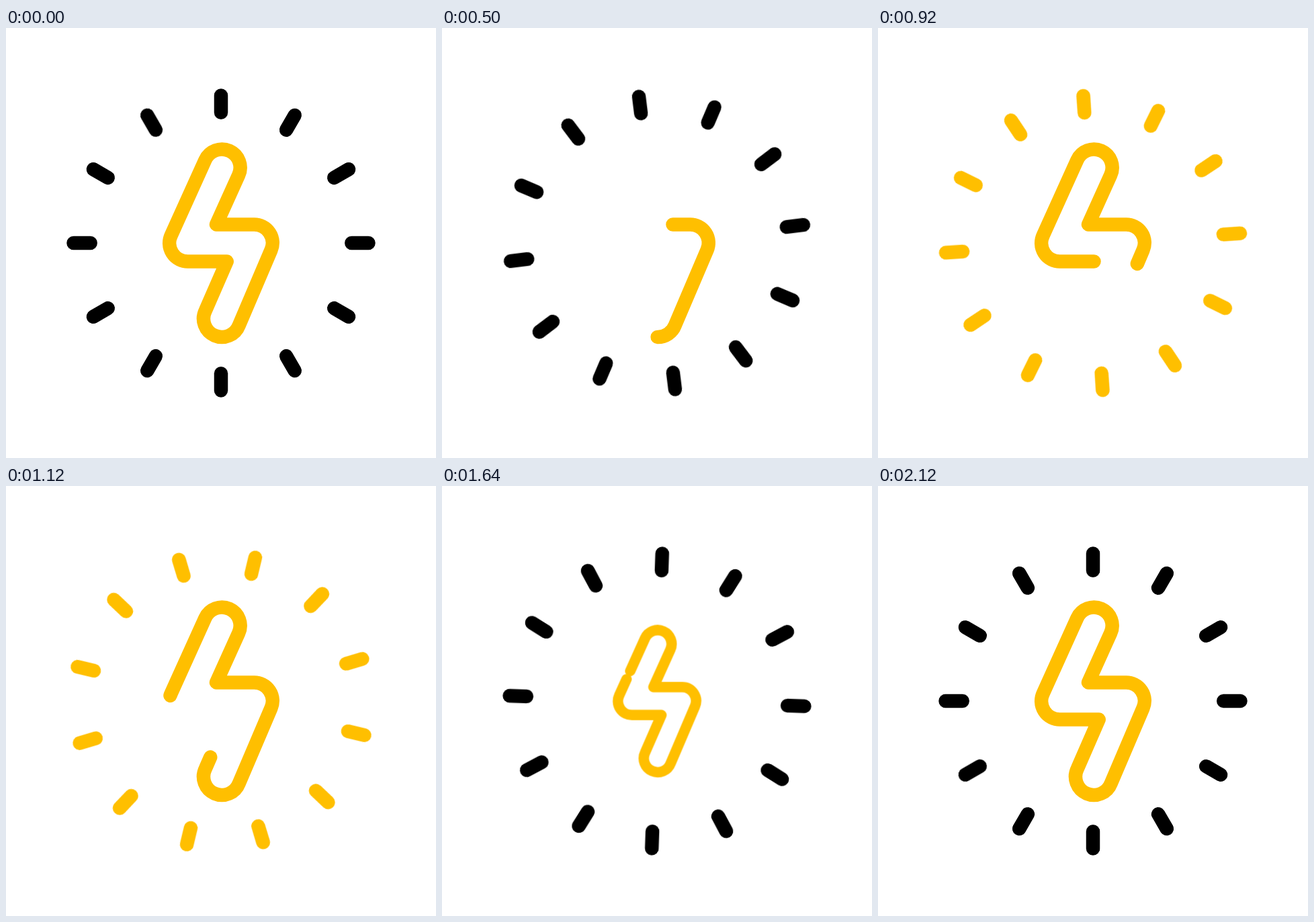
Animation of 640x640 px, one loop 3.02 s. Source, as an HTML page:

```html
<!DOCTYPE html>
<html lang="en">
<head>
<meta charset="utf-8">
<title>Energy bolt</title>
<style>
  html, body { margin: 0; width: 100%; height: 100%; overflow: hidden; background: #fff; }
  svg { display: block; width: 100vw; height: 100vh; }
  path { fill: none; stroke-width: 20.5; stroke-linecap: round; stroke-linejoin: round; }
  #ticks, #bolt { transform-origin: 320px 320px; }
  #ticks {
    stroke: #000;
    animation: turn 3020ms infinite, tint 3020ms step-end infinite;
  }
  #bolt { stroke: #ffbf00; animation: pulse 3020ms linear infinite; }

  @keyframes turn {
    0% { transform: rotate(0deg); animation-timing-function: cubic-bezier(.65, 0, .02, 1); }
    70.2%, 100% { transform: rotate(-90deg); }
  }
  @keyframes tint {
    0% { stroke: #000; }
    21.19% { stroke: #ffbf00; }
    50.99%, 100% { stroke: #000; }
  }
  @keyframes pulse {
    0%, 47.68% { transform: scale(1); animation-timing-function: ease-in-out; }
    54.97% { transform: scale(.753); animation-timing-function: ease-in-out; }
    66.23%, 100% { transform: scale(1); }
  }
</style>
</head>
<body>
<svg viewBox="0 0 640 640">
  <g id="ticks"></g>
  <g id="bolt"></g>
</svg>
<script>
  const LOOP = 3020, STEP = 20, MOVE_END = 2120;
  const OUTLINE = 'M245.7 308.8L296.4 196.6A27.3 27.3 0 1 1 346.2 219.1L313 292.5H369.4' +
    'A27.3 27.3 0 0 1 394.5 330.7L346.8 442.5A27.3 27.3 0 1 1 296.7 420.9' +
    'L328.7 347.5H270.6A27.3 27.3 0 0 1 245.7 308.8Z';

  function addPath(parent, d) {
    const path = document.createElementNS('http://www.w3.org/2000/svg', 'path');
    path.setAttribute('d', d);
    return document.getElementById(parent).appendChild(path);
  }

  for (let i = 0; i < 12; i++) {
    addPath('ticks', 'M320 100.5V125.7').setAttribute('transform', `rotate(${i * 30} 320 320)`);
  }
  const strokes = [addPath('bolt', OUTLINE), addPath('bolt', OUTLINE)];
  const length = strokes[0].getTotalLength();

  // Smooth monotone curve through [time, value] keys, flat at both ends.
  function curve(keys) {
    const rate = i => (keys[i + 1][1] - keys[i][1]) / (keys[i + 1][0] - keys[i][0]);
    const slopes = keys.map((_, i) => {
      if (i === 0 || i === keys.length - 1) return 0;
      const a = rate(i - 1), b = rate(i);
      return a * b > 0 ? 2 * a * b / (a + b) : 0;
    });
    return t => {
      let i = 0;
      while (i < keys.length - 2 && t > keys[i + 1][0]) i++;
      const [t0, v0] = keys[i], [t1, v1] = keys[i + 1];
      const h = t1 - t0, u = (t - t0) / h, w = 1 - u;
      return v0 * (1 + 2 * u) * w * w + slopes[i] * h * u * w * w +
             v1 * (3 - 2 * u) * u * u - slopes[i + 1] * h * u * u * w;
    };
  }

  // Both ends of the drawn part, as distance along the outline.
  const tail = curve([[0, 58], [500, 319.6], [760, 462.5], [940, 714], [1120, 798],
                      [1440, 843], [1640, 855], [MOVE_END, 858]]);
  const head = curve([[0, 858], [500, 575], [760, 724], [940, 1263], [1120, 1430],
                      [1440, 1596], [1640, 1640], [MOVE_END, 1660]]);
  const GAP = { from: 554.5, to: 600, start: 440, end: 1000 };

  function drawPart(path, from, to) {
    const size = to - from;
    path.style.display = size > 0 ? '' : 'none';
    path.style.strokeDasharray = size >= length ? 'none' : `${size} ${length - size}`;
    path.style.strokeDashoffset = -(from % length);
  }

  function render(now) {
    const t = Math.min(Math.floor(now % LOOP / STEP) * STEP, MOVE_END);
    const from = tail(t), to = head(t);
    const split = t >= GAP.start && t < GAP.end;
    if (t === 0 || t === MOVE_END) {
      drawPart(strokes[0], 0, length);
    } else {
      drawPart(strokes[0], from, split ? Math.min(to, GAP.from) : to);
    }
    drawPart(strokes[1], Math.max(from, GAP.to), split ? to : 0);
  }

  const begin = performance.now();
  function frame() {
    render(performance.now() - begin);
    requestAnimationFrame(frame);
  }
  frame();
</script>
</body>
</html>
```
